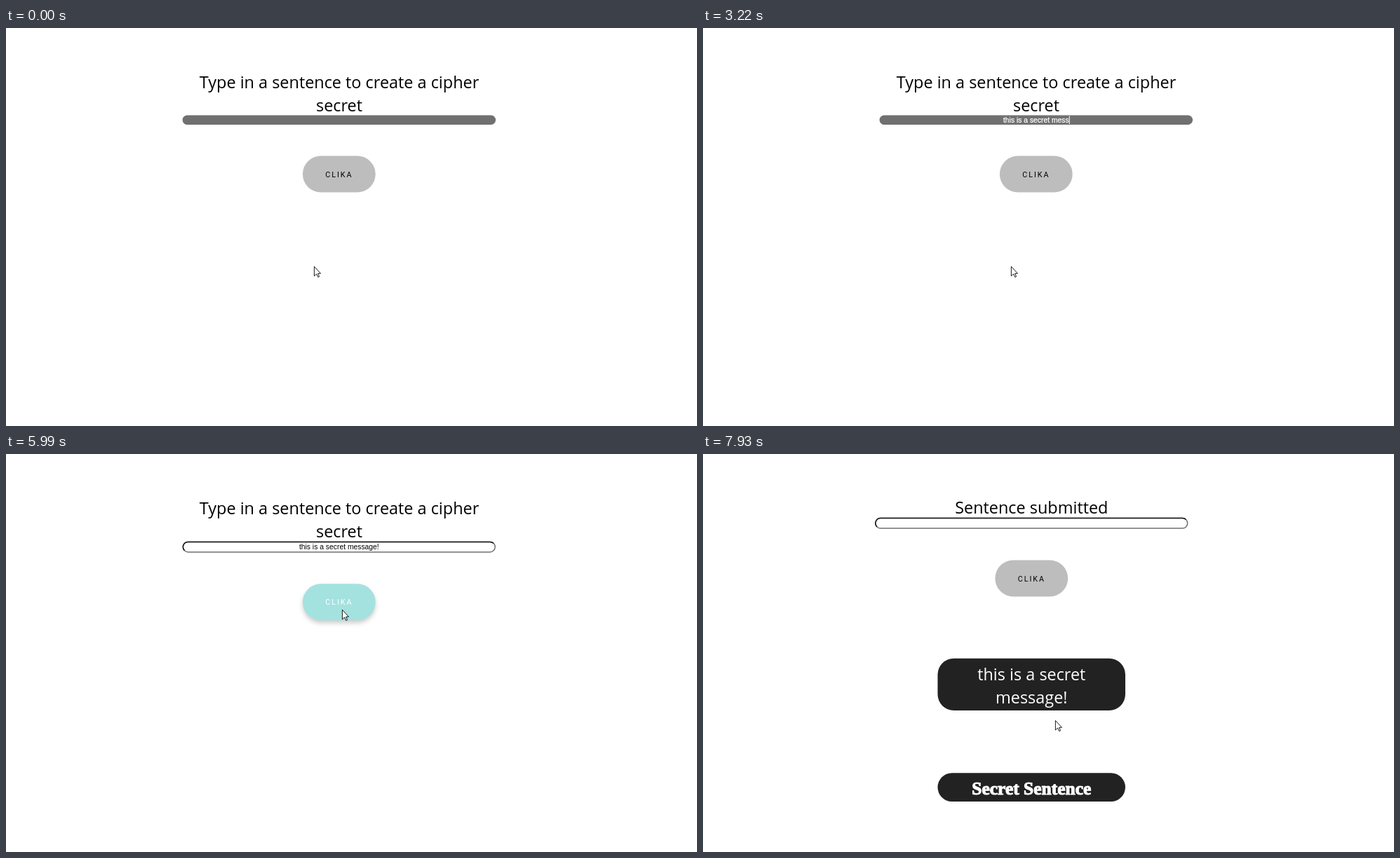
Write an HTML page that moves like this. It is 985 px wide and 568 px high and loops after 8 s.

```html
<!DOCTYPE html>
<html lang="en">
<head>
<meta charset="utf-8">
<title>Cipher secret</title>
<style>
  html, body { margin: 0; width: 100%; height: 100%; overflow: hidden; background: #fff; }
  svg { display: block; width: 985px; height: 568px; }
  text { text-anchor: middle; font: 23.45px "Open Sans", "Noto Sans", sans-serif; }
  #typed { text-anchor: start; font: 10.35px "Liberation Sans", Arial, sans-serif; }
  #label { font: 10.8px Roboto, sans-serif; letter-spacing: 1.94px; }
  #secret text { font: bold 25.5px "Liberation Serif", serif; stroke: #fff; stroke-width: 1.1px; }
  .white { fill: #fff; }
</style>
</head>
<body>
<svg viewBox="0 0 985 568">
  <g id="ask">
    <text x="475" y="85.5">Type in a sentence to create a cipher</text>
    <text x="475" y="118.8">secret</text>
  </g>
  <text id="done" x="468.3" y="84.6">Sentence submitted</text>

  <g id="form">
    <rect id="bar" x="-223.2" width="446.4" height="13.3" rx="6.6" fill="#707070"/>
    <g id="frame" transform="translate(-222.4 .8)" fill="none" stroke-width="1.5">
      <rect width="444.8" height="14.5" rx="7.25" stroke="#707070"/>
      <path d="M2.1 12.4A7.25 7.25 0 0 1 7.25 0H437.55A7.25 7.25 0 0 1 442.7 2.1" stroke="#1a1a1a"/>
    </g>
    <text id="typed"></text>
    <rect id="caret" y="1" width="1" height="11.5" fill="#fff"/>
    <g id="button">
      <rect id="face" x="-51.9" width="103.8" height="51.9" rx="25.9"/>
      <text id="label" y="30">CLIKA</text>
    </g>
  </g>

  <g id="result">
    <rect id="pill" x="334.5" y="291.8" width="267.5" rx="23"/>
    <text id="first" class="white" x="468.3" y="322.8"></text>
    <text id="second" class="white" x="468.3" y="356.2"></text>
    <g id="secret">
      <rect x="334.5" y="421.8" width="267.5" height="40.8" rx="20.4" fill="#222"/>
      <text class="white" x="468.3" y="452.7">Secret Sentence</text>
    </g>
  </g>

  <g id="pointer">
    <path id="arrow" d="M.4 .4V14L3.6 11L5.8 15.6L7.6 14.8L5.7 10.3H9.5Z" fill="#fff" stroke="#000" stroke-width=".9"/>
    <path id="beam" d="M-3 -6H-1L0 -5L1 -6H3M0 -5V5M-3 6H-1L0 5L1 6H3" fill="none" stroke="#333"/>
  </g>
</svg>
<script>
const LOOP = 8000, BLUR = 5990, SUBMIT = 6080, REVEAL = 7540, BLINK = 540;
const MESSAGE = 'this is a secret message!';
const GREY = [189, 189, 189], DARK = [34, 34, 34], AQUA = [164, 226, 224];
const BLACK = [0, 0, 0], WHITE = [255, 255, 255];

// typing rhythm: [time, characters typed], even speed in between
const RHYTHM = [[490, 1], [680, 3], [1260, 7], [1660, 9], [1860, 11], [2240, 13],
  [2440, 14], [3020, 20], [3220, 21], [3620, 22], [3820, 24], [4810, 25]];

const ui = {};
document.querySelectorAll('[id]').forEach(el => ui[el.id] = el);

const set = (el, attrs) => {
  for (const key in attrs) el.setAttribute(key, attrs[key]);
};
const show = (el, on) => { el.style.display = on ? '' : 'none'; };
const write = (el, text) => { if (el.textContent !== text) el.textContent = text; };
const mix = (a, b, k) => `rgb(${a.map((v, i) => Math.round(v + (b[i] - v) * k))})`;

// smooth 0 to 1 between two times
function ramp(t, from, to) {
  const k = Math.min(1, Math.max(0, (t - from) / (to - from)));
  return k * k * (3 - 2 * k);
}

// when the n-th character is typed
function keyTime(n) {
  const i = RHYTHM.findIndex(([, count]) => count >= n);
  const [t1, n1] = RHYTHM[i];
  if (n1 === n) return t1;
  const [t0, n0] = RHYTHM[i - 1];
  return t0 + (t1 - t0) * (n - n0) / (n1 - n0);
}
const KEYS = [...MESSAGE].map((_, i) => keyTime(i + 1));

function pointerAt(t) {
  const toButton = ramp(t, 5520, 5790), toPill = ramp(t, 6600, 7160), away = ramp(t, 7660, 7930);
  return {
    x: 439 + 40 * toButton + 16 * toPill + 7 * away,
    y: 340 - 118 * toButton + 99 * toPill + 59 * away
  };
}

function hover(el, base, k) {
  set(el, { fill: mix(base, AQUA, k) });
  el.style.filter = k ? `drop-shadow(0 4px 3px rgba(0,0,0,${.2 * k}))` : 'none';
}

function drawInput(t, focus) {
  show(ui.bar, focus);
  show(ui.frame, !focus);
  const count = t < SUBMIT ? KEYS.filter(key => key <= t).length : 0;
  write(ui.typed, MESSAGE.slice(0, count).replace(/ /g, '\u00a0'));
  const half = count ? ui.typed.getComputedTextLength() / 2 : 0;
  set(ui.typed, {
    x: -half, y: focus ? 10 : 11.5, fill: focus ? '#fff' : '#000',
    stroke: focus ? '#fff' : 'none', 'stroke-width': .25
  });
  set(ui.caret, { x: Math.round(half) });
  show(ui.caret, focus && count && (t - KEYS[count - 1]) % (2 * BLINK) < BLINK);
}

function drawForm(t) {
  const focus = t < BLUR, sent = t >= SUBMIT;
  show(ui.ask, !sent);
  show(ui.done, sent);
  set(ui.form, { transform: sent ? 'translate(468.3 90.8)' : 'translate(474.8 124.6)' });
  drawInput(t, focus);

  const k = ramp(t, 5690, 5990) - ramp(t, SUBMIT, 6170);
  set(ui.button, { transform: `translate(0 ${focus ? 58 : 60.7})` });
  hover(ui.face, GREY, k);
  set(ui.label, { fill: mix(BLACK, WHITE, k) });
}

function drawResult(t) {
  const open = t >= REVEAL;
  show(ui.result, t >= SUBMIT);
  set(ui.pill, { height: open ? 74.2 : 40.8 });
  hover(ui.pill, DARK, ramp(t, 6860, 7160) - ramp(t, 7690, 7930));
  write(ui.first, open ? 'this is a secret' : 'Regular Sentence');
  write(ui.second, open ? 'message!' : '');
  set(ui.secret, { transform: `translate(0 ${open ? 33.4 : 0})` });
}

function drawPointer(t) {
  const { x, y } = pointerAt(t);
  const overText = t >= SUBMIT && y > 296 && y < 366;
  set(ui.pointer, { transform: `translate(${x} ${y})` });
  show(ui.arrow, !overText);
  show(ui.beam, overText);
}

const start = performance.now();
(function tick() {
  const t = (performance.now() - start) % LOOP;
  drawForm(t);
  drawResult(t);
  drawPointer(t);
  requestAnimationFrame(tick);
})();
</script>
</body>
</html>
```
